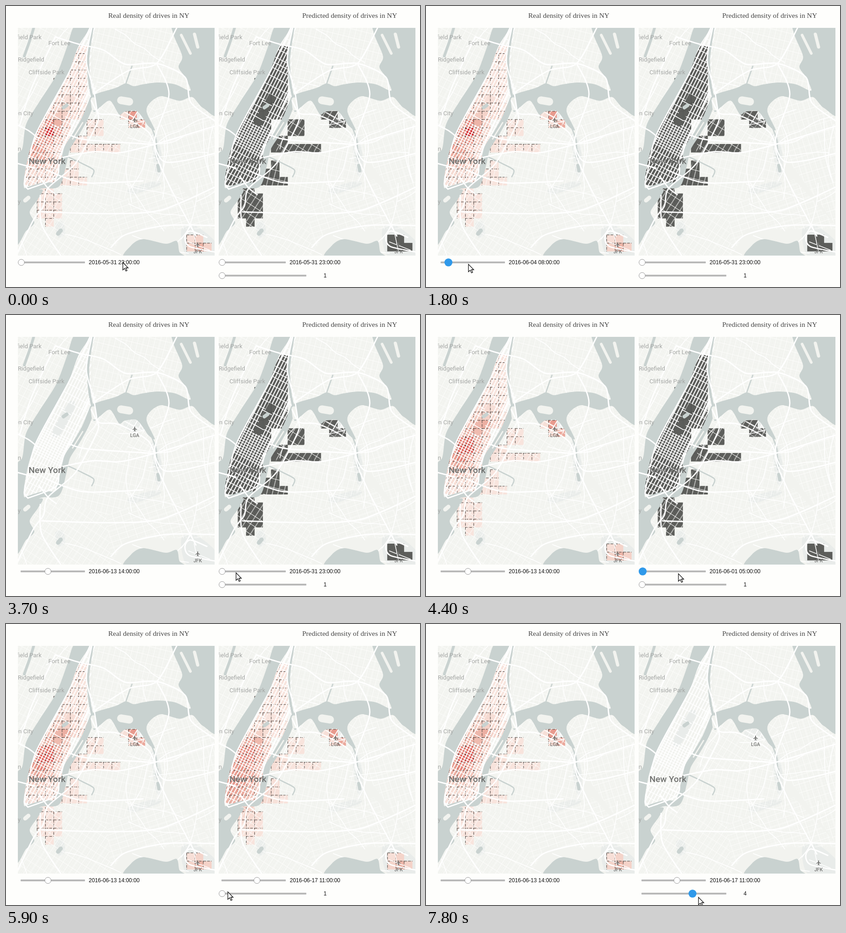
Recreate the animation shown at these times as an HTML page. Size 907 by 617 pixels, loop 8 s.

```html
<!DOCTYPE html>
<html lang="en">
<head>
<meta charset="utf-8">
<title>Density of drives</title>
<style>
html, body { margin: 0; width: 100%; height: 100%; overflow: hidden; background: #fefefc; }
svg { display: block; width: 100%; height: 100%; }
.title { font: 15.5px "Liberation Serif", serif; fill: #444; }
.value { font: 12px "Liberation Sans", sans-serif; fill: #111; text-anchor: middle; }
.place { font: 13.2px Roboto, sans-serif; fill: #a6a8a6; text-anchor: end; }
.city { font-size: 19px; font-weight: 500; fill: #70716f; }
.air { font-size: 10.8px; font-weight: 500; fill: #777876; text-anchor: middle; }
.line { fill: none; stroke-linejoin: round; stroke-linecap: round; }
</style>
</head>
<body>
<svg id="stage" viewBox="0 0 907 617"></svg>
<script>
const LAND = '#f2f3ef', WATER = '#c9d2d0', PARK = '#e9ecea', ROAD = '#fff';
const CW = 18.2, CH = 18.1;
const $ = id => document.getElementById(id);
const clamp = (v, a = 0, b = 1) => Math.max(a, Math.min(b, v));

let seed = 7;
const rand = (a, b) => {
  seed = seed * 16807 % 2147483647;
  return a + (b - a) * seed / 2147483647;
};

// Smooth path through "x,y x,y ..." points.
function curve(text, closed) {
  const p = text.split(' ').map(q => q.split(',').map(Number)), n = p.length;
  const pt = k => closed ? p[(k + n) % n] : p[clamp(k, 0, n - 1)];
  const ctrl = (a, b, c) => [0, 1].map(k => (a[k] + (b[k] - c[k]) / 7).toFixed(1));
  let d = 'M' + p[0];
  for (let k = 0; k < (closed ? n : n - 1); k++)
    d += `C${ctrl(pt(k), pt(k + 1), pt(k - 1))} ${ctrl(pt(k + 1), pt(k), pt(k + 2))} ${pt(k + 1)}`;
  return d;
}
const area = (text, fill) => `<path d="${curve(text, true)}" fill="${fill}"/>`;
const line = (text, width, color = ROAD) => `<path class="line" d="${curve(text)}" stroke="${color}" stroke-width="${width}"/>`;

// ---- Density cells ----
function buildCells() {
  const list = [];
  const block = (i, j, w, h = 1) => {
    for (let k = 0; k < w * h; k++) {
      const ci = i + k % w, cj = j + Math.floor(k / w);
      list.push({ i: ci, j: cj, x: 50 + CW * ci, y: 394 + CH * cj });
    }
  };
  // The long island: its west shore leans, its east side is cut off.
  for (let j = -17; j < 0; j++) {
    const y = 394 + CH * (j + 1);
    const shore = 52 + (321 - y) * (y < 321 ? .45 : .19);
    const first = Math.floor((shore - 50) / CW);
    block(first, j, (j < -8 ? 7 : j < -5 ? 5 : 4) - first);
  }
  block(7, -8, 2, 2); block(5, -6, 2); block(5, -5, 6);
  block(5, -3, 1); block(4, -2, 2, 2); block(6, -1, 1);
  block(1, 0, 2); block(1, 1, 3, 3); block(2, 4, 1);
  block(11, -9, 2); block(12, -8, 2);
  block(19, 6, 2); block(19, 7, 3);
  return list;
}
const cells = buildCells();

// Hot spots: x, y, radius, strength.
const airports = [[280, 242, 9, .45], [298, 257, 9, .35], [424, 530, 13, .28]];
const mayEnd = [[95, 274, 13, .8], [66, 315, 26, .4], [110, 250, 30, .15], ...airports];
const midJune = [[124, 238, 5, .6], [90, 286, 17, .65], [68, 315, 24, .4], [112, 245, 30, .2], ...airports];
const forecast = [[58, 350, 40, .42], [92, 280, 26, .5], ...airports];

function red(c, spots) {
  const x = c.x + CW / 2, y = c.y + CH / 2;
  const v = spots.reduce((s, [a, b, r, k]) => s + k * Math.exp(-((x - a) ** 2 + (y - b) ** 2) / (2 * r * r)), 0);
  return `hsl(${16 - 18 * clamp(v)} 66% ${92 - 44 * clamp(v)}%)`;
}
const box = (c, fill) => `<rect x="${c.x}" y="${c.y}" width="${CW}" height="${CH}" fill="${fill}"/>`;
const edges = (list, style) => `<path d="${list.map(c => `M${c.x} ${c.y}h${CW}M${c.x} ${c.y}v${CH}`).join('')}" fill="none" ${style}/>`;
const redCells = (spots, list = cells) => list.map(c => box(c, red(c, spots))).join('') +
  edges(list, 'stroke="#453d39" stroke-dasharray="6 2.5"');
const darkCells = list => list.map(c => box(c, '#5d5e5b')).join('') + edges(list, 'stroke="#4b4c49" stroke-width=".8"');
const discs = list => list.map(c => `<circle cx="${c.x + CW / 2}" cy="${c.y + CH / 2}" r="22" fill="#41423f"/>`).join('');

// ---- Streets ----
function hatch(id, angle, w, h, width, color) {
  return `<pattern id="${id}" patternUnits="userSpaceOnUse" width="${w}" height="${h}" patternTransform="rotate(${angle})">
    <path d="M0 ${h / 2}H${w}M${w / 2} 0V${h}" stroke="${color}" stroke-width="${width}"/></pattern>`;
}
// Districts: outline and street angle.
const districts = [
  ['M26 48H150L40 300H26Z', 27], ['M190 48H400V190H190Z', 14], ['M170 190H330L325 304 150 330Z', 31],
  ['M330 190H457V480L325 300Z', -17], ['M150 330L325 304 352 382 220 440 120 400Z', 14],
  ['M60 400H120L220 440 230 548H26V480Z', 33], ['M220 440L366 380 457 480V490H262L230 548Z', 72]
];
const fillDistricts = kind => districts.map(([d], n) => `<path d="${d}" fill="url(#${kind + n})"/>`).join('');

function arterials() {
  let out = '';
  for (let n = 0; n < 34; n++) {
    let x = rand(30, 457), y = rand(50, 548);
    if (x < 200 && y < 400 && x + y / 2 > 190) continue;
    let a = (n % 2 ? rand(-.4, .5) : rand(1.1, 1.9)), pts = [];
    for (let k = 0; k < 6; k++) {
      pts.push(`${x.toFixed()},${y.toFixed()}`);
      a += rand(-.3, .3);
      x += 26 * Math.cos(a);
      y += 26 * Math.sin(a);
    }
    out += line(pts.join(' '), 1.7);
  }
  return out;
}
// Avenues run along x, cross streets along y, before rotation.
function grid() {
  let ave = '', cross = '';
  for (let k = -9; k <= 9; k++) ave += `M290 ${k * 6.6}H-36L-140 ${k * 7.6 - 5}`;
  for (let u = -140; u < 285; u += u < -36 ? rand(8, 14) : u < 31 ? 5.6 : rand(9, 20)) cross += `M${u.toFixed(1)} -60V60`;
  return `<g clip-path="url(#borough)"><g class="line" stroke="${ROAD}" transform="translate(95 290) rotate(-63.2)">
    <path d="${ave}" stroke-width="2.1"/><path d="${cross}" stroke-width="1.5"/></g></g>`;
}
const highways = [
  '108,68 160,84 214,97 262,128 330,126 392,156 405,212 457,252',
  '188,48 176,120 192,184 200,234', '194,190 268,142 330,126 374,48',
  '330,126 357,194 325,300 352,382 416,505', '187,208 204,236 246,240 312,277 348,342 457,324',
  '118,334 190,320 250,322 325,304 457,264', '200,234 200,256 152,346 92,400 82,440 60,470 26,540',
  '78,452 230,456 340,448 457,398', '457,482 350,482 262,502 230,530',
  '182,184 140,278 117,332 110,376 48,402', '184,48 136,150 66,280 48,352 40,390 48,402',
  '26,262 50,274 70,290', '26,346 64,356', '72,374 92,400 110,414', '88,360 170,388 300,384', '136,282 178,294 325,304',
  '108,68 56,180 30,262', '75,416 78,480 120,548'
];

// ---- Water, drawn over the density ----
const water = () =>
  area('150,44 133,92 110,152 72,212 44,260 36,312 20,345 20,520 44,494 62,476 52,452 70,424 80,403 45,405 39,385 52,318 80,250 110,198 136,150 158,90 184,44', WATER) +
  area('186,200 200,192 240,180 262,170 280,176 300,172 332,168 370,172 404,186 392,156 378,134 386,110 366,60 372,40 470,40 470,232 432,224 408,200 380,208 340,198 316,212 308,232 326,272 312,264 300,246 285,230 260,232 248,238 228,208 206,222 192,232', WATER) +
  area('262,556 274,526 300,512 350,522 374,516 380,540 392,556', WATER) +
  line('45,405 80,394 112,391 125,350 134,312 154,280 174,244 190,204', 13, WATER) +
  line('190,204 183,170 180,115 190,44', 5, WATER) +
  line('62,44 52,76 40,110', 6, WATER) + line('133,330 165,345 192,360 188,375', 2.6, WATER) +
  line('320,270 329,296 331,340', 2.6, WATER) + line('262,172 276,132', 2.6, WATER) +
  line('330,320 331,330', 8, WATER) + line('333,350 335,362', 7, WATER) +
  line('126,223 133,218', 8, WATER) + line('114,500 120,493', 9, WATER) +
  line('146,292 168,256', 3, LAND) + line('191,206 193,224', 11, LAND) + line('252,207 270,210', 17, LAND) +
  line('384,64 404,104', 6, LAND) + line('413,62 420,90', 7, LAND) + line('42,427 49,421', 9, LAND);

const label = (x, y, text, cls = '') => `<text class="place ${cls}" x="${x}" y="${y}">${text}</text>`;
const plane = (x, y) => `<path transform="translate(${x} ${y})" fill="#777876" d="M0-5.5L1-4V-1.2L5 1.2V2.2L1 1.2V3.6L2.4 5V5.7L0 5-2.4 5.7V5L-1 3.6V1.2L-5 2.2V1.2L-1-1.2V-4Z"/>`;

const defs = `<defs>
  <clipPath id="panel"><rect x="26" y="48" width="431" height="500"/></clipPath>
  <clipPath id="borough"><path clip-rule="evenodd" d="M196 48H165L120 150 62 250 36 320 26 400 60 410 112 390 125 350 150 290 200 190 185 150 188 90ZM101 258L117 265 152 200 137 192Z"/></clipPath>
  ${districts.map(([, a], n) => hatch('d' + n, a, 12, 19, 1.1, '#fcfcfa') + hatch('t' + n, a, 4.5, 6, .5, '#f8f9f6')).join('')}
  <g id="land">
    <rect x="26" y="48" width="431" height="500" fill="${LAND}"/>
    ${area('101,258 117,265 152,200 137,192', PARK)}${area('384,492 410,480 457,516 457,548 396,548', PARK)}
    ${area('256,236 285,229 304,250 272,256', PARK)}${area('318,284 336,290 342,366 328,366', PARK)}
    ${area('270,400 330,384 336,394 276,414', PARK)}${area('108,478 124,474 130,500 114,508', PARK)}
    ${fillDistricts('t')}
  </g>
  <g id="cover">
    ${fillDistricts('d')}${arterials()}${grid()}
    ${line('103,240 124,252', 1.5)}${line('121,208 142,219', 1.5)}
    ${line('262,234 302,256', 1.6)}${line('274,256 288,232', 1.6)}
    ${line('440,508 404,494 392,508 402,528 457,540', 3)}${line('400,518 446,536', 1.6)}${line('412,502 420,540', 1.6)}
    ${water()}${highways.map(h => line(h, 2.9)).join('')}
    ${label(78, 73, 'Ridgefield Park')}${label(141, 85.5, 'Fort Lee')}${label(84, 122, 'Ridgefield')}
    ${label(128, 149.5, 'Cliffside Park')}${label(60, 239.5, 'Union City')}${label(33, 318, 'Hoboken')}${label(32, 434, 'Jersey City')}
    ${label(130.5, 346.5, 'New York', 'city')}
    ${plane(282, 250)}${label(282, 268, 'LGA', 'air')}${plane(420, 524)}${label(420, 542.5, 'JFK', 'air')}
  </g></defs>`;

const layers = {
  may: redCells(mayEnd), june: redCells(midJune),
  dark: darkCells(cells), south: darkCells(cells.filter(c => c.j > 5)), discs: discs(cells),
  warm: redCells(forecast), tip: redCells(forecast, cells.filter(c => c.i < 1 && c.j > -5))
};
const panel = (dx, names) => `<g transform="translate(${dx})" clip-path="url(#panel)"><use href="#land"/>
  ${names.map(n => `<g id="${n}">${layers[n]}</g>`).join('')}<use href="#cover"/></g>`;
const slider = (id, x, y, w, tx) => `<rect x="${x}" y="${y - 2}" width="${w}" height="4" rx="1" fill="#b9b9b9"/>
  <circle id="${id}Knob" cy="${y}"/><text id="${id}Text" class="value" x="${tx}" y="${y + 4}"></text>`;

$('stage').innerHTML = defs + `<rect width="907" height="617" fill="#fefefc"/>
  <text class="title" x="224" y="26">Real density of drives in NY</text>
  <text class="title" x="649" y="26">Predicted density of drives in NY</text>` +
  panel(0, ['may', 'june']) + panel(440, ['dark', 'south', 'discs', 'warm', 'tip']) +
  slider('real', 32, 563, 141, 237) + slider('pred', 472, 563, 141, 677) + slider('step', 472, 592, 186, 699) +
  `<path id="cursor" d="M0 0V16.5L4 13 6.6 19 9.2 17.9 6.6 12H11.6Z" fill="#fff" stroke="#111" stroke-width="1.3"/>`;

// ---- Motion ----
const leftMap = { 0: 'may', 2000: '', 3900: 'june' };
const rightMap = { 0: 'dark', 4500: 'south', 4700: 'discs', 5600: '', 5900: 'warm', 6500: '', 6700: 'tip', 6800: 'warm', 7700: '' };
// Cursor glides: begin, end, x, y.
const glides = [
  [100, 700, 22, 580], [700, 900, 35, 571], [1300, 1800, 93, 567], [2800, 2900, 409, 569], [2900, 3200, 578, 572],
  [3200, 3900, 475, 564], [4100, 4400, 553, 568], [5000, 5200, 555, 562], [5300, 6000, 474, 592], [6100, 6600, 573, 600], [6900, 7100, 597, 600]
];
const pick = (map, t) => map[Math.max(...Object.keys(map).filter(k => k <= t))];
const within = (t, a, b) => t >= a && t < b;

function pointer(t) {
  let x = 256, y = 563;
  for (const [a, b, gx, gy] of glides) {
    const f = clamp((t - a) / (b - a));
    x += (gx - x) * f;
    y += (gy - y) * f;
  }
  return [Math.round(x), Math.round(y)];
}
function show(ids, active) {
  for (const id of ids) $(id).style.display = id === active ? '' : 'none';
}
function setSlider(id, x, on, text) {
  const look = on ? { cx: x, r: 8.7, fill: '#2f99ea', stroke: 'none' } : { cx: x, r: 6.8, fill: '#fff', stroke: '#999' };
  for (const k in look) $(id + 'Knob').setAttribute(k, look[k]);
  $(id + 'Text').textContent = text;
}
const stamp = h => new Date(Date.UTC(2016, 4, 31, 23 + h)).toISOString().slice(0, 19).replace('T', ' ');
const hourX = (x, h) => x + h / 5.19;

function draw(ms) {
  const t = Math.floor(ms % 8000 / 100) * 100;
  show(['may', 'june'], pick(leftMap, t));
  show(['dark', 'south', 'discs', 'warm', 'tip'], pick(rightMap, t));
  const real = t < 2000 ? Math.round(81 * clamp((t - 1300) / 500)) : t < 2400 ? 300 : 303;
  const pred = pick({ 0: 0, 4000: 6, 4700: 401, 5200: 396 }, t);
  const step = pick({ 0: 1, 6400: 2, 6600: 3, 7700: 4 }, t);
  setSlider('real', hourX(33.5, real), within(t, 1200, 3100), stamp(real));
  setSlider('pred', hourX(473.5, pred), within(t, 3900, 5600), stamp(pred));
  setSlider('step', 473.5 + 36.8 * (step - 1), t >= 6200, step);
  $('cursor').setAttribute('transform', `translate(${pointer(t)})`);
}
let start;
function tick(now) {
  start ??= now;
  draw(now - start);
  requestAnimationFrame(tick);
}
draw(0);
requestAnimationFrame(tick);
</script>
</body>
</html>
```
